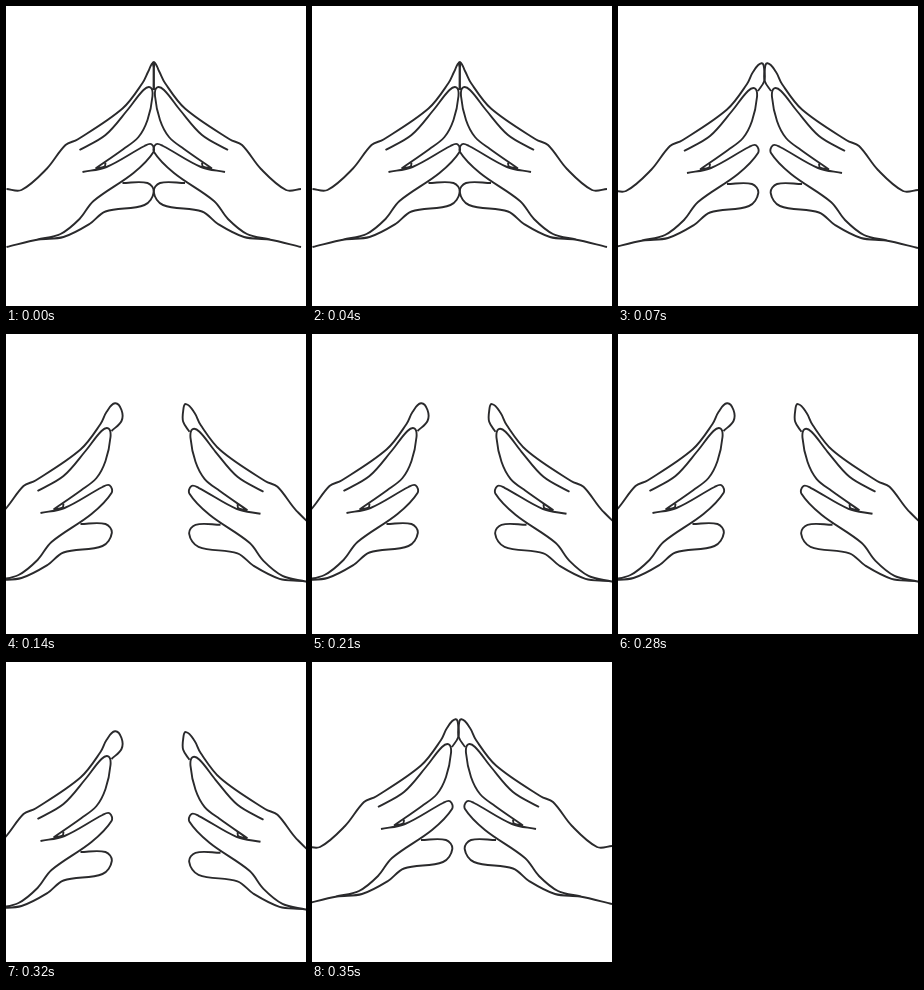
Recreate the animation shown at these times as an HTML page. Size 300 by 300 pixels, loop 420 ms.

```html
<!DOCTYPE html>
<html lang="en">
<head>
<meta charset="utf-8">
<title>Hands</title>
<style>
html, body { margin: 0; width: 100%; height: 100%; overflow: hidden; background: #fff; }
svg { display: block; width: 100vw; height: 100vh; }
path { fill: none; stroke: #2a2a2c; stroke-width: 1.9; stroke-linejoin: round; }
</style>
</head>
<body>
<svg viewBox="0 0 300 300">
  <path id="left"/>
  <path id="right"/>
</svg>
<script>
// Key points of one hand, drawn as the left one; the right one is its mirror image.
const arm = '-7,184 8,185 33,164 52,140 64,134.5 109,103.5 129,78';
const index = '66,145 92,130 114,105 130,85 137,82.5 139,91 134,115 125,132 110,144 82,163.5';
const palm = '69,167 93,162 131,141 138,139.2 140,147 120,168 80,196 66,214 47,229 24,234.5';
const thumb = '109,178 134,178 140.3,187 131,200 92,206.5 76,219 50,232 25,234.5 -7,242';
const fold = '82,163.5 91,161.5 92,157.5';

const MIRROR = 293;
const STEP = 70;

// Offset of each hand and the right edge of its fingertip.
const closed = { left: [7.5, -1, 140.2], right: [-5, -1, 140.2] };
const near = { left: [0, 0, 146.3], right: [0, 0, 146.3] };
const apart = { left: [-34.5, 12, 150], right: [30.5, 12.8, 146.3] };
const order = [closed, near, apart, apart, apart, near];

const points = text => text.split(' ').map(p => p.split(',').map(Number));

// Smooth curve: tangents follow the neighbours, handles are a third of the chord.
function curve(pts) {
  const handle = (i, len) => {
    const a = pts[Math.max(i - 1, 0)], c = pts[Math.min(i + 1, pts.length - 1)];
    const k = len / Math.hypot(c[0] - a[0], c[1] - a[1]);
    return pts[i].map((v, n) => v + (c[n] - a[n]) * k);
  };
  let d = 'M' + pts[0];
  for (let i = 1; i < pts.length; i++) {
    const len = Math.hypot(pts[i][0] - pts[i - 1][0], pts[i][1] - pts[i - 1][1]) / 3;
    d += `C${handle(i - 1, len)} ${handle(i, -len)} ${pts[i]}`;
  }
  return d;
}

// The fingertip flattens into a straight seam as its right edge moves in.
const tip = edge => [[135, 66], [Math.min(143.5, edge), 57.3], [edge, 64], [edge, 75], [140, 85]];

const fixed = [index, palm, thumb, fold].map(t => curve(points(t))).join('');
const hand = edge => curve(points(arm).concat(tip(edge))) + fixed;

function place(id, [x, y, edge]) {
  const el = document.getElementById(id);
  const flip = id === 'right';
  el.setAttribute('d', hand(edge));
  el.setAttribute('transform',
    `translate(${x + (flip ? MIRROR : 0)} ${y}) scale(${flip ? -1 : 1} 1)`);
}

let shown = null;
function show(pose) {
  if (pose === shown) return;
  shown = pose;
  for (const side in pose) place(side, pose[side]);
}

let start = null;
function tick(now) {
  if (start === null) start = now;
  show(order[Math.floor((now - start) / STEP) % order.length]);
  requestAnimationFrame(tick);
}
show(closed);
requestAnimationFrame(tick);
</script>
</body>
</html>
```
